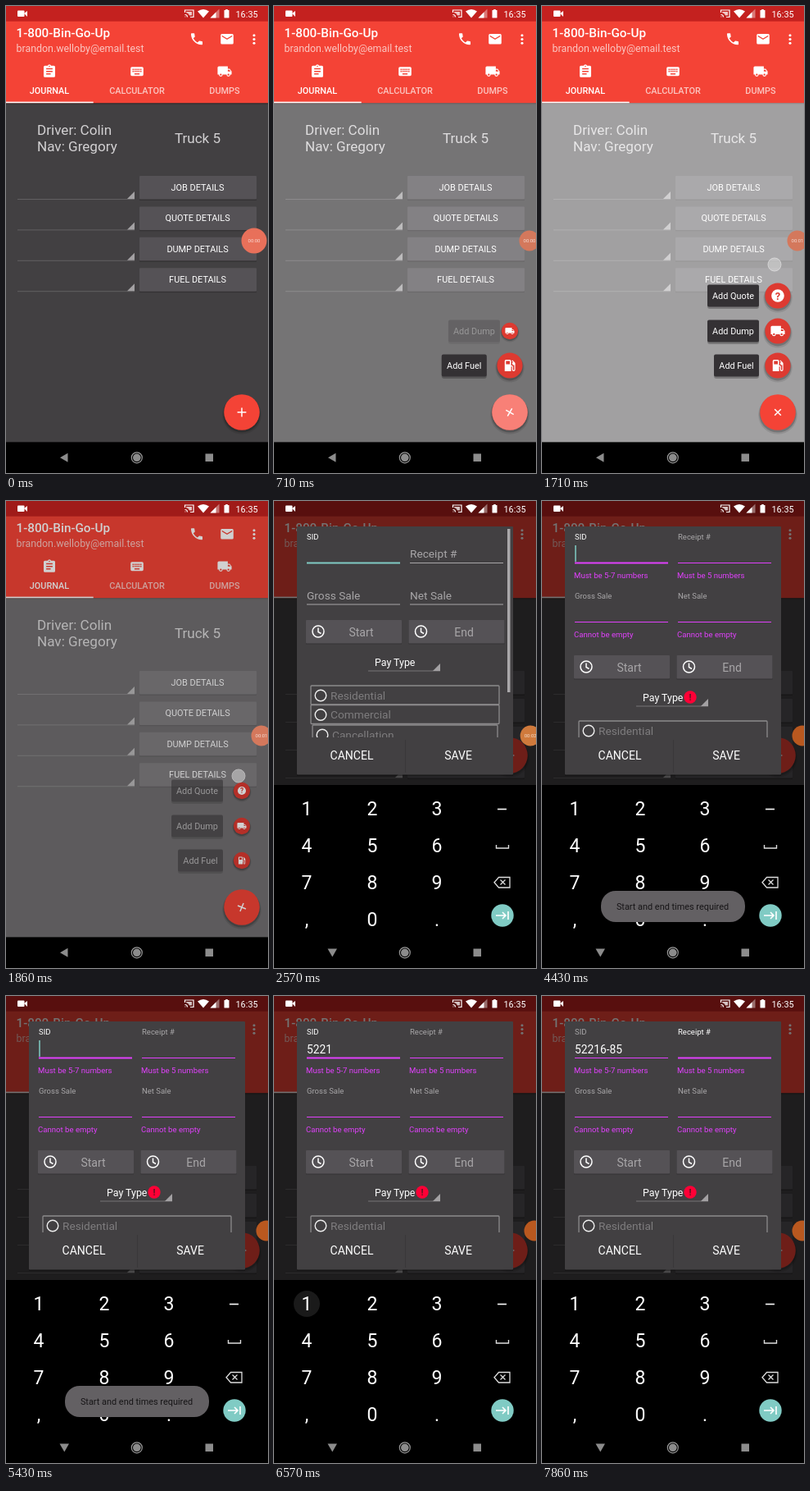
An HTML page that plays this animation: 320 px wide and 569 px high, repeating every 8 s.

```html
<!DOCTYPE html>
<html lang="en">
<head>
<meta charset="utf-8">
<title>Job journal</title>
<style>
html, body { margin: 0; width: 100%; height: 100%; overflow: hidden; background: #000; }
svg { display: block; width: 100vw; height: 100vh; font-family: Roboto, "Liberation Sans", sans-serif; }
</style>
</head>
<body>
<svg id="stage" viewBox="0 0 320 569"></svg>
<script>
const STEPS = 56, FPS = 7;
const RED = '#f44336', MINI_RED = '#dd3a31', TEAL = '#80cbc4', PURPLE = '#e040fb', PANEL = '#424042', KEY = '#555256', HINT = '#a8a6a8';
const STATUS_END = 18.7, HEADER_END = 118.2, KEYBOARD_TOP = 346, NAV_TOP = 531.6;

const ICONS = {
  phone: 'M6.62 10.79c1.44 2.83 3.76 5.14 6.59 6.59l2.2-2.2c.27-.27.67-.36 1.02-.24 1.12.37 2.33.57 3.57.57.55 0 1 .45 1 1V20c0 .55-.45 1-1 1-9.39 0-17-7.61-17-17 0-.55.45-1 1-1h3.5c.55 0 1 .45 1 1 0 1.25.2 2.45.57 3.57.11.35.03.74-.25 1.02z',
  mail: 'M4 4H20a2 2 0 0 1 2 2V18a2 2 0 0 1-2 2H4a2 2 0 0 1-2-2V6a2 2 0 0 1 2-2zM20 8V6l-8 5-8-5v2l8 5z',
  clipboard: 'M5 3H9.2a3 3 0 0 1 5.6 0H19a2 2 0 0 1 2 2V19a2 2 0 0 1-2 2H5a2 2 0 0 1-2-2V5a2 2 0 0 1 2-2zM11 4a1 1 0 0 0 2 0 1 1 0 0 0-2 0zM7 7v2h10V7zM7 11v2h10v-2zM7 15v2h7v-2z',
  keyboard: 'M4 5H20a2 2 0 0 1 2 2V17a2 2 0 0 1-2 2H4a2 2 0 0 1-2-2V7a2 2 0 0 1 2-2zM8 15v2h8v-2z' +
    [5, 8, 11, 14, 17].map(x => `M${x} 8v2h2v-2zM${x} 11v2h2v-2z`).join(''),
  truck: 'M20 8h-3V4H3a2 2 0 0 0-2 2v11h2a3 3 0 0 0 6 0h6a3 3 0 0 0 6 0h2v-5zM4.5 17a1.5 1.5 0 0 0 3 0 1.5 1.5 0 0 0-3 0zM16.5 17a1.5 1.5 0 0 0 3 0 1.5 1.5 0 0 0-3 0zM19.5 9.5H17V12h4.46z',
  fuel: 'M4 21V5a2 2 0 0 1 2-2h6a2 2 0 0 1 2 2v7h1a2 2 0 0 1 2 2v4.5a1 1 0 0 0 2 0V11.3a2.5 2.5 0 0 1-1.9-4.6L15 4.56l1.06-1.06 3.7 3.7a2.5 2.5 0 0 1 .74 1.8v9.5a2.5 2.5 0 0 1-5 0v-5H14V21zM6 5v5h6V5z',
};

const clamp = v => Math.max(0, Math.min(1, v));
const ramp = (s, from, to) => clamp((s - from) / (to - from));
const pulse = (s, a, b, c, d) => Math.min(ramp(s, a, b), 1 - ramp(s, c, d));
const mix = (a, b, k) => a + (b - a) * k;
const overshoot = p => 1 + 2.7 * (p - 1) ** 3 + 1.7 * (p - 1) ** 2;

const rect = (x, y, w, h, fill, attrs = '') => `<rect x="${x}" y="${y}" width="${w}" height="${h}" fill="${fill}" ${attrs}/>`;
const circle = (x, y, r, fill, attrs = '') => `<circle cx="${x}" cy="${y}" r="${r}" fill="${fill}" ${attrs}/>`;
const path = (d, fill, attrs = '') => `<path d="${d}" fill="${fill}" ${attrs}/>`;
const stroke = (d, color, width = 1) => path(d, 'none', `stroke="${color}" stroke-width="${width}"`);
const text = (x, y, size, str, fill = '#fff', attrs = '') => `<text x="${x}" y="${y}" font-size="${size}" fill="${fill}" ${attrs}>${str}</text>`;
const middle = (x, y, size, str, fill, attrs = '') => text(x, y, size, str, fill, `text-anchor="middle" ${attrs}`);
const group = (opacity, body, attrs = '') => opacity > 0 ? `<g opacity="${opacity}" ${attrs}>${body}</g>` : '';
const icon = (name, x, y, size = 18.7, fill = '#fff') =>
  path(ICONS[name], fill, `fill-rule="evenodd" transform="translate(${x - size / 2} ${y - size / 2}) scale(${size / 24})"`);
const shadowed = (x, y, r, fill) => circle(x, y + 3, r + 2, '#000', 'opacity=".1"') +
  circle(x, y + 2, r + .8, '#000', 'opacity=".2"') + circle(x, y, r, fill);
const touch = (x, y, opacity) => group(opacity, circle(x, y, 8, '#ddd', 'opacity=".75" stroke="#fff"'));

function header() {
  const tab = (x, name, label, fill) => icon(name, x, 79.7) + middle(x, 107, 10.9, label, fill, 'font-weight="500"');
  return rect(0, 0, 320, HEADER_END, RED) + rect(0, 0, 320, STATUS_END, '#c4211f') +
    text(12.5, 37.5, 15.3, '1-800-Bin-Go-Up', '#fff', 'font-weight="500"') +
    text(12.5, 56, 12.4, 'brandon.welloby@email.test', '#fbc6c1') +
    icon('phone', 233, 40.3) + icon('mail', 270, 40.3) +
    [-4.7, 0, 4.7].map(d => circle(303, 40.5 + d, 1.56, '#fff')).join('') +
    tab(53, 'clipboard', 'JOURNAL', '#fff') + tab(160, 'keyboard', 'CALCULATOR', '#fbc6c1') + tab(267, 'truck', 'DUMPS', '#fbc6c1') +
    rect(0, HEADER_END - 1.55, 106.7, 1.55, '#fff');
}

function journal(s) {
  // Rows move closer together once the keyboard takes up space.
  const spacing = s < 15 ? 37.4 : 34;
  const rows = ['JOB', 'QUOTE', 'DUMP', 'FUEL'].map((name, i) => {
    const y = 221 + i * spacing;
    return stroke(`M14 ${y + 14.5}H157`, '#626062') + path(`M157 ${y + 5}v9h-9z`, '#a3a1a3') +
      rect(163, y - 13, 143, 29, '#353335') + rect(163, y - 14, 143, 28.5, KEY, 'rx="1"') +
      middle(234, y + 4, 10.9, name + ' DETAILS');
  });
  return rect(0, HEADER_END, 320, NAV_TOP - HEADER_END, PANEL) + rect(0, HEADER_END, 320, 2, '#000', 'opacity=".15"') +
    text(38, 157, 17.1, 'Driver: Colin', '#d2d0d2') + text(38, 177, 17.1, 'Nav: Gregory', '#d2d0d2') +
    middle(234, 167, 17.1, 'Truck 5', '#d2d0d2') + rows.join('');
}

function menu(s) {
  const closing = 1 - ramp(s, 12, 14);
  const item = (y, label, left, start, glyph) => {
    const open = ramp(s, start, start + 2), scale = open * closing;
    const slide = 60 * (1 - overshoot(ramp(s, start, start + 4)));
    const width = 265 - left;
    return group(open * open * closing, rect(left, y - 12, width, 28, '#000', 'rx="3" opacity=".25"') +
      rect(left, y - 13.5, width, 27, '#343134', 'rx="2"') +
      middle(left + width / 2, y + 4, 10.9, label), `transform="translate(${slide} 0)"`) +
      group(scale > 0 ? 1 : 0, shadowed(0, 0, 15.6, MINI_RED) + glyph, `transform="translate(288 ${y}) scale(${mix(.3, 1, scale)})"`);
  };
  const help = circle(0, 0, 7.8, '#fff') + middle(0, 4.7, 13, '?', MINI_RED, 'font-weight="700"');
  const fabY = s < 15 ? 495 : 310;
  const turn = 45 * ramp(s, 3, 6) * closing;
  return rect(0, HEADER_END, 320, NAV_TOP - HEADER_END, '#fff', `opacity="${.5 * ramp(s, 3, 6.7) * closing}"`) +
    item(353, 'Add Quote', 202, 5, help) +
    item(396, 'Add Dump', 202, 4, icon('truck', 0, 0)) +
    item(438, 'Add Fuel', 210, 3, icon('fuel', 0, 0)) +
    shadowed(288, fabY, 21.8, RED) +
    circle(288, fabY, 21.8, '#fff', `opacity="${.32 * pulse(s, 2, 4, 5, 8)}"`) +
    `<g transform="translate(288 ${fabY}) rotate(${turn})">${stroke('M-5.4 0H5.4M0-5.4V5.4', '#fff', 1.5)}</g>`;
}

const TYPED = '52216-85', KEY_STEPS = [40, 42, 43, 45, 47, 49, 50, 52], NEXT_STEP = 54;

function fields(s) {
  const invalid = s >= 25, onReceipt = s >= NEXT_STEP;
  const value = TYPED.slice(0, KEY_STEPS.filter(k => k <= s).length);
  const field = (x, y, label, error, focused, floated) => {
    const lift = floated ? 1 : ramp(s, 26, 28);
    const width = focused ? 2 : 1;
    return text(x, y - 22 * lift, mix(13.7, 9.5, lift), label, focused ? '#fff' : HINT) +
      stroke(`M${x} ${y + 6.5}h114`, invalid ? PURPLE : focused ? TEAL : HINT, width) +
      group(ramp(s, 26, 28), text(x - 1, y + 25, 9.6, error, PURPLE));
  };
  const row = invalid ? 141 : 119.5;
  const caretX = onReceipt ? 167 : 41 + [...value].reduce((w, c) => w + (c === '-' ? 3.8 : 7.7), 0);
  const caretOn = Math.floor(s / 3.5) % 2 === 0;
  return field(40, 69, 'SID', 'Must be 5-7 numbers', !onReceipt, true) +
    field(166, 69, 'Receipt #', 'Must be 5 numbers', onReceipt) +
    field(40, row, 'Gross Sale', 'Cannot be empty') +
    field(166, row, 'Net Sale', 'Cannot be empty') +
    text(40, 69.5, 13.8, value) +
    (caretOn ? rect(caretX - .75, 54, 1.5, 20, TEAL) : '');
}

function options(s) {
  const timeButton = (x, label) => rect(x, 146, 117, 28.5, '#353335') + rect(x, 145, 117, 28.5, KEY, 'rx="1"') +
    stroke(`M${x + 8} 159a7 7 0 1 0 14 0a7 7 0 1 0-14 0M${x + 15} 154.5v5l3.5 2`, '#fff', 1.5) +
    middle(x + 67.5, 164.5, 14, label, HINT);
  const radio = (y, label, inset = 0) =>
    rect(45 + inset, y, 230 - 2 * inset, 23, 'none', 'stroke="#8c8a8c" stroke-width="1.3" rx="1"') +
    circle(57 + inset, y + 12, 6.8, 'none', 'stroke="#eee" stroke-width="1.4"') +
    text(69 + inset, y + 16.5, 13.7, label, '#7e7c7e');
  return `<g transform="translate(0 ${s >= 25 ? 43 : 0})">` +
    timeButton(39, 'Start') + timeButton(164.5, 'End') +
    text(123, 201, 12.4, 'Pay Type') + stroke('M115 207H203', '#777577') + path('M203 198v9h-9z', '#a3a1a3') +
    (s >= 25 ? circle(181, 196, 7.7, '#ff0036') + middle(181, 200, 11, '!', '#5a1420', 'font-weight="700"') : '') +
    radio(225, 'Residential') + radio(248.5, 'Commercial') + radio(273, 'Cancellation', 2) + '</g>';
}

function dialog(s) {
  const press = pulse(s, 23, 25, 27, 30);
  return group(.55 * ramp(s, 12, 15), rect(0, 0, 320, NAV_TOP, '#000')) +
    group(ramp(s, 13, 15),
      rect(28, 33, 264, 302, '#000', 'opacity=".3"') + rect(28, 31, 264, 302.5, PANEL, 'rx="1"') +
      `<g clip-path="url(#body)">${fields(s)}${options(s)}</g>` +
      group(1 - ramp(s, 18, 22), rect(285, 34, 3.5, 199, '#aaa8aa')) +
      stroke('M160.5 291V331', '#393739') +
      group(press, rect(163, 291, 124, 38, '#4d4b4e') + circle(222, 311, 28, '#5e5c5f')) +
      middle(95, 315, 14, 'CANCEL') + middle(225, 315, 14, 'SAVE'));
}

const KEYS = ['123', '456', '789', ',0.'];
function keyAt(ch) {
  const row = KEYS.findIndex(k => k.includes(ch));
  return row < 0 ? [279, 375] : [[40, 120, 199][KEYS[row].indexOf(ch)], 375 + 45 * row];
}

function keyboard(s) {
  const drop = 185 * (1 - ramp(s, 14, 16));
  if (drop === 185) return '';
  const digits = KEYS.flatMap(row => [...row]).map(ch => {
    const [x, y] = keyAt(ch);
    return middle(x, y + 8, 23, ch);
  });
  const last = KEY_STEPS.findLastIndex(k => k <= s);
  let ripple = '';
  if (last >= 0 && s - KEY_STEPS[last] < 2) {
    const [x, y] = keyAt(TYPED[last]);
    ripple = circle(x, y, 16, '#fff', `opacity="${s === KEY_STEPS[last] ? .25 : .1}"`);
    if (s === KEY_STEPS[last]) ripple += touch(x, y, .6);
  }
  return `<g transform="translate(0 ${drop})">` + rect(0, KEYBOARD_TOP, 320, 190, '#000') + ripple + digits.join('') +
    stroke('M273 375.5h11', '#fff', 1.6) + stroke('M271.5 419v4h15v-4', '#ddd', 1.4) +
    stroke('M274.5 458.5H288V471H274.5L269 464.7zM276.5 461.5l6 6M282.5 461.5l-6 6', '#ddd', 1.3) +
    circle(279, 505, 13.7, TEAL) + stroke('M271 505H283M279 501l4 4-4 4M286 500v10', '#fff', 1.6) + '</g>';
}

function navBar(s) {
  const back = s < 15 ? 'M66 550.3l9.5-5.5v11z' : 'M65.5 545.5h11.5l-5.7 10z';
  return rect(0, NAV_TOP, 320, 38, '#000') + path(back, '#8c8c8c') +
    circle(159.8, 550.3, 6.5, 'none', 'stroke="#999" stroke-width="1.2"') + circle(159.8, 550.3, 4.8, '#8c8c8c') +
    rect(243.5, 545.5, 9.5, 9.5, '#8c8c8c');
}

function statusIcons() {
  return rect(14, 5.5, 8.5, 7.5, '#fff', 'rx="1"') + path('M22 9l4-3v7z', '#fff') +
    stroke('M218.5 8V5H229V13.5H225M218.5 10.5a3 3 0 0 1 3 3M218.5 13h.8', '#fff', 1.2) +
    path('M220 7h7v4.5h-3q-1-3-4-3.500z', '#fff', 'opacity=".75"') +
    path('M234 6.5q7-5 14 0L241 14.5z', '#fff') +
    path('M249.5 14.5h11v-11z', '#fff', 'opacity=".4"') + path('M249.5 14.5h7v-7z', '#fff') +
    rect(266.5, 5, 6, 9.5, '#fff', 'rx=".5"') + rect(268.2, 4, 2.6, 2, '#fff') + text(280.5, 13.5, 10.9, '16:35');
}

function chip(s) {
  const dock = ramp(s, 0, 5);
  const x = mix(303, 312, dock) + 6 * ramp(s, 16, 26);
  const color = s < 3 ? '#e8705a' : s < 14 ? '#d4785c' : s < 24 ? '#d07a3c' : '#b9581f';
  return circle(x, 286, mix(15.5, 12.5, dock), color) +
    group(.75 * (1 - ramp(s, 20, 26)), middle(x, 288, 6, '00:0' + Math.floor(s / FPS)));
}

function toast(s) {
  return group(pulse(s, 28, 30, 41, 43), rect(72, 475, 176, 38, '#636063', 'rx="18"') +
    middle(159.5, 498, 10.9, 'Start and end times required', '#171517'));
}

function render(s) {
  return '<clipPath id="body"><rect x="28" y="31" width="264" height="257"/></clipPath>' +
    journal(s) + header() + menu(s) + dialog(s) + keyboard(s) + navBar(s) + statusIcons() + chip(s) + toast(s) +
    touch(288, 495, s === 3 ? 1 : 0) +
    touch(284, mix(315, 335, ramp(s, 12, 13)), s === 12 || s === 13 ? .7 : 0) +
    touch(221, 312, s > 23 && s < 28 ? .45 : 0) +
    touch(279, 505, s === NEXT_STEP ? .6 : 0);
}

const stage = document.getElementById('stage');
let shown = -1;
const start = performance.now();
function tick() {
  // The small lead keeps step edges on the 10 ms grid.
  const step = Math.floor((performance.now() - start + 5) * FPS / 1000) % STEPS;
  if (step !== shown) stage.innerHTML = render(shown = step);
  requestAnimationFrame(tick);
}
tick();
</script>
</body>
</html>
```
